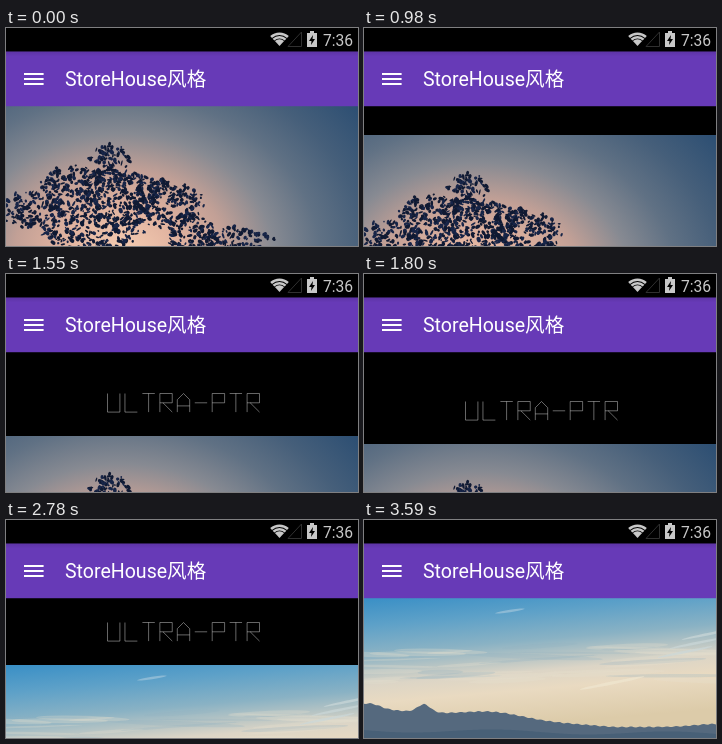
Animation of 352x218 px, one loop 4200 ms. Source, as an HTML page with a canvas:

```html
<!DOCTYPE html>
<html lang="zh">
<head>
<meta charset="utf-8">
<style>
html, body { margin: 0; width: 100%; height: 100%; overflow: hidden; background: #000; }
canvas { display: block; width: 352px; height: 218px; }
</style>
</head>
<body>
<canvas id="stage" width="352" height="218"></canvas>
<script>
const W = 352, H = 218, LOOP = 4200;
const DP = 352 / 360, STATUS = 24 * DP, BAR = 80 * DP, TOP = 78;
const HEADER = 67;
const ctx = document.getElementById('stage').getContext('2d');

function random(seed) {
  return () => (seed = (seed * 16807) % 2147483647) / 2147483647;
}

function layer(paint) {
  const canvas = document.createElement('canvas');
  canvas.width = W;
  canvas.height = H - TOP;
  paint(canvas.getContext('2d'));
  return canvas;
}

function fade(g, gradient, stops) {
  stops.forEach(([at, color]) => gradient.addColorStop(at, color));
  g.fillStyle = gradient;
  g.fillRect(0, 0, W, H);
}

function blob(g, x, y, rx, ry, color, angle = 0) {
  g.fillStyle = color;
  g.beginPath();
  g.ellipse(x, y, rx, ry, angle, 0, 7);
  g.fill();
}

function hills(g, color, ridge) {
  g.fillStyle = color;
  g.beginPath();
  g.moveTo(0, H);
  for (let x = 0; x <= W; x += 2) g.lineTo(x, ridge(x));
  g.lineTo(W, H);
  g.fill();
}

const bump = (x, center, width, height) => height * Math.exp(-(((x - center) / width) ** 2));

const dusk = layer(g => {
  const rnd = random(71);
  g.save();
  g.scale(1.25, 1);
  fade(g, g.createRadialGradient(92, 150, 0, 92, 150, 245), [
    [0, '#f8d0b4'], [.2, '#e0b29f'], [.35, '#c2a096'], [.5, '#878a92'],
    [.65, '#607184'], [.8, '#465f7a'], [1, '#2a4d72']]);
  g.restore();
  // Leaf clusters: centre, radii
  const clusters = [[26, 104, 30, 18], [66, 84, 32, 24], [104, 58, 20, 20], [112, 92, 40, 30],
    [160, 98, 38, 24], [185, 128, 24, 18], [230, 133, 38, 12], [85, 125, 50, 18]];
  for (const [cx, cy, rx, ry] of clusters) {
    for (let i = 0; i < rx * ry * .24; i++) {
      const angle = rnd() * Math.PI * 2, r = Math.sqrt(rnd()) * (.9 + rnd() * .2);
      blob(g, cx + rx * r * Math.cos(angle), cy + ry * r * Math.sin(angle),
        .8 + rnd() * 2.2, .7 + rnd() * 1.4, rnd() < .6 ? '#101a33' : '#172548', rnd() * 3);
    }
  }
});

const day = layer(g => {
  const rnd = random(19);
  fade(g, g.createLinearGradient(0, 0, 12, 140), [
    [0, '#398fc6'], [.2, '#5ea1c8'], [.4, '#8ab2c4'], [.52, '#b6c4c4'],
    [.62, '#dcd5c6'], [.75, '#e9dac1'], [1, '#dccba9']]);
  // Thin cloud streaks, denser and paler towards the horizon
  for (let i = 0; i < 34; i++) {
    const y = 48 + rnd() * 36;
    blob(g, rnd() * W, y, 20 + rnd() * 50, .8 + rnd() * 2,
      i % 3 ? '#e6ddcc48' : '#8fb0c040', -.08 + rnd() * .12);
  }
  for (let i = 0; i < 3; i++) blob(g, 345 - i * 12, 36 + i * 9, 28, 1.3, '#cbd8dab0', -.2);
  blob(g, 146, 13, 15, 1.2, '#a9c9dca0', -.15);
  blob(g, 248, 85, 33, 1.5, '#f0e6d0c0', -.2);
  hills(g, '#55697e', x => 110 + 19 * Math.min(1, x / 250) + Math.sin(x * .7) * .5
    - bump(x, 60, 9, 8) - bump(x, 6, 14, 5) - bump(x, 130, 40, 6) - bump(x, W, 30, 3));
  hills(g, '#486077', x => 132 + 2 * Math.sin(x / 28) + x / 90);
});

// Each stroke is x1 y1 x2 y2 on a grid of 4 by 6 cells
const glyphs = {
  U: '0006 0646 4640',
  L: '0006 0646',
  T: '0040 2026',
  R: '0040 4043 4303 0006 1346',
  A: '2002 0206 2042 4246 0444',
  P: '0006 0040 4043 4303',
  '-': '0343'
};
const CELL = 3.1, PITCH = 17.45;
const scatter = random(4321);
const strokes = [...'ULTRA-PTR'].flatMap((letter, n) => glyphs[letter].split(' ').map(code => {
  const [x1, y1, x2, y2] = [...code].map(d => d * CELL);
  return {
    x: 101.5 + n * PITCH + (x1 + x2) / 2,
    y: (y1 + y2) / 2,
    dx: (x2 - x1) / 2,
    dy: (y2 - y1) / 2,
    drift: (scatter() - .2) * 100
  };
}));

// Strokes drop in, spin and grow one after another as the header opens
function drawWord(pull, t) {
  const progress = Math.min(1, pull / HEADER);
  ctx.strokeStyle = '#fff';
  ctx.lineWidth = 1;
  strokes.forEach((s, i) => {
    const k = Math.max(0, Math.min(1, (progress - .3 * i / strokes.length) / .7));
    const age = t - 2400 - i * 35;
    const glow = age >= 0 && t < CLOSE ? .6 * Math.max(0, 1 - age / 400) : 0;
    ctx.save();
    ctx.globalAlpha = .4 * k + glow;
    ctx.translate(s.x + s.drift * (1 - k), TOP + pull - 42.5 + s.y - 40 * (1 - k));
    ctx.rotate(k * Math.PI * 2);
    ctx.scale(k, k);
    ctx.beginPath();
    ctx.moveTo(-s.dx, -s.dy);
    ctx.lineTo(s.dx, s.dy);
    ctx.stroke();
    ctx.restore();
  });
}

function drawStatus() {
  const x = 273.5, y = 18;
  ctx.fillStyle = '#000';
  ctx.fillRect(0, 0, W, STATUS);
  ctx.fillStyle = ctx.strokeStyle = '#c8c8c8';
  const fan = r => {
    ctx.beginPath();
    ctx.arc(x, y, r, -Math.PI * .74, -Math.PI * .26);
  };
  ctx.lineWidth = 2.6;
  [12.3, 8.8].forEach(r => { fan(r); ctx.stroke(); });
  fan(6.7);
  ctx.lineTo(x, y);
  ctx.fill();
  ctx.strokeStyle = '#303030';
  ctx.lineWidth = 1;
  ctx.stroke(new Path2D('M282 18.5H295.5V4Z'));
  ctx.fill(new Path2D('M301 5h3V3h4v2h3v14h-10Z'));
  ctx.font = `${16 * DP}px Roboto, sans-serif`;
  ctx.fillText('7:36', 317, 17.5);
  ctx.fillStyle = '#000';
  ctx.fill(new Path2D('M307 7l-4 6h2.5l-.5 4l4-6h-2.5Z'));
}

function drawToolbar() {
  const shade = ctx.createLinearGradient(0, STATUS, 0, STATUS + 5);
  shade.addColorStop(0, '#5d34a5');
  shade.addColorStop(1, '#673ab7');
  ctx.fillStyle = shade;
  ctx.fillRect(0, STATUS, W, BAR - STATUS);
  ctx.fillStyle = '#fff';
  for (let i = 0; i < 3; i++) ctx.fillRect(18, 45 + i * 5, 19.6, 2);
  ctx.font = `${20 * DP}px Roboto, "Noto Sans CJK SC", "Noto Sans CJK", sans-serif`;
  ctx.fillText('StoreHouse风格', 59, 58);
}

// The screen refreshes only at these moments
const DRAG = 740, HELD = 1800, RELEASE = 2330, SETTLE = 2480, CLOSE = 2780;
const ticks = [0, DRAG, 860, 980, 1130, 1280, 1400, 1550, 1675, HELD,
  RELEASE, SETTLE, 2630, CLOSE, 2900, 3050, 3200, 3320, 3470];

function pullAt(t) {
  if (t < DRAG) return 0;
  if (t < RELEASE) {
    const u = (t - DRAG) / (HELD - DRAG);
    return Math.round(4 + 88 * Math.sin(Math.PI / 2 * u ** 1.15));
  }
  if (t < SETTLE) return HEADER + 2;
  if (t < CLOSE) return HEADER;
  return Math.floor(HEADER * Math.exp((CLOSE - t) / 143));
}

function draw(clock) {
  const t = ticks.findLast(tick => tick <= clock);
  const pull = pullAt(t);
  ctx.fillStyle = '#000';
  ctx.fillRect(0, 0, W, H);
  if (pull) drawWord(pull, t);
  ctx.drawImage(t < CLOSE ? dusk : day, 0, TOP + pull);
  drawStatus();
  drawToolbar();
}

const start = performance.now();
function frame() {
  draw((performance.now() - start) % LOOP);
  requestAnimationFrame(frame);
}
frame();
</script>
</body>
</html>
```
